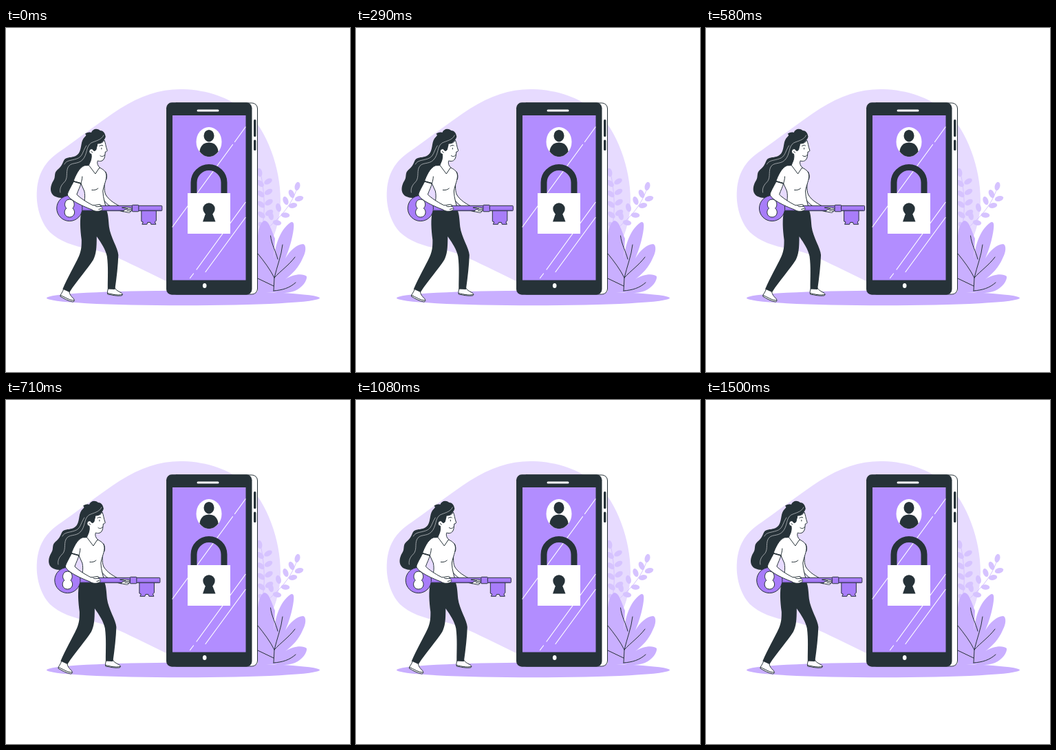
Recreate the animation shown at these times as an HTML page. Size 500 by 500 pixels, loop 1.54 s.

```html
<!DOCTYPE html>
<html lang="en">
<head>
<meta charset="utf-8">
<title>Unlocking a phone</title>
<style>
html, body { margin: 0; width: 100%; height: 100%; overflow: hidden; background: #fff; }
svg { display: block; width: 100vw; height: 100vh; }
.dark { fill: #263238; }
.white { fill: #fff; }
.leaf { fill: #c9afff; }
.line { fill: none; stroke: #263238; stroke-linecap: round; stroke-linejoin: round; }
.skin { fill: #fff; stroke: #263238; stroke-linecap: round; stroke-linejoin: round; }
.key { fill: #a87df9; stroke: #263238; stroke-linejoin: round; }
.glare { fill: none; stroke: #fff; stroke-width: 1.2; stroke-linecap: round; }
</style>
</head>
<body>
<svg viewBox="0 0 500 500">
  <path fill="#e7dbff" d="M45 235C47 212 56 195 76 181C101 164 134 138 166 117C196 98 226 88 258 89C292 90 325 101 350 122C379 148 399 203 399 250C399 296 377 338 345 361C312 384 268 385 235 369L190 347C167 336 145 325 121 321C98 317 78 310 64 297C50 282 43 258 45 235Z"/>
  <ellipse class="leaf" cx="257.5" cy="392.5" rx="198.5" ry="10.8"/>

  <g id="sprigs" fill="#d6c3ff" stroke="#d6c3ff"></g>
  <g class="leaf">
    <path d="M366 300C374 308 385 322 389 335C392 313 399 293 413 283C418 280 419 285 418 292C416 308 411 323 406 335C412 324 423 314 432 314C437 316 436 326 431 335C426 347 416 358 406 365C417 358 431 356 437 361C438 367 431 377 420 382C409 386 397 386 389 384L366 384Z"/>
    <path d="M366 302C367 290 371 281 376 280C383 282 387 297 391 306L389 340L366 316Z"/>
  </g>
  <g class="line" stroke-width="1">
    <path d="M384.500 302C386 315 392 324 395 336M402 315C400 332 394 346 390 363M366 328C375 339 384 351 390 363M420 333C411 345 399 353 390 363L389 382M366 364L389 375M421 370C412 378 402 381 389 382"/>
  </g>

  <rect class="skin" x="240" y="109" width="125.500" height="278" rx="8"/>
  <rect class="dark" x="233" y="108.300" width="124.500" height="279.400" rx="8"/>
  <rect x="242" y="127" width="106.500" height="239.500" fill="#b28dff"/>
  <path class="glare" stroke-width="3" style="stroke-width:3" d="M279 120H308"/>
  <ellipse class="white" cx="288.700" cy="374.500" rx="2.800" ry="3.500"/>
  <rect class="dark" x="360" y="133" width="3.400" height="25" rx="1.500"/>
  <rect class="dark" x="360" y="162.500" width="3.400" height="15.500" rx="1.500"/>
  <path class="glare" d="M348 144L332.500 165.500M329.500 169.500L242 289M348 253.500L277 351M272.500 357L267.500 363.500M348 275.500L290 354.500"/>

  <ellipse class="white" cx="295" cy="165.500" rx="18.500" ry="21.500"/>
  <ellipse class="dark" cx="295" cy="156.700" rx="7.500" ry="8.700"/>
  <path class="dark" d="M281.500 179.500C282 171 288 166.500 295 166.500S308 171 308.500 179.500C305 184.500 300 187 295 187S285 184.500 281.500 179.500Z"/>
  <path class="line" stroke-width="9" style="stroke-linecap:butt" d="M273 241V224.500A22 22 0 0 1 317 224.500V241"/>
  <rect class="white" x="264" y="240" width="62" height="59"/>
  <circle class="dark" cx="295" cy="263" r="8.700"/>
  <path class="dark" d="M291 267L286 281.500H304.500L299 267Z"/>

  <g id="woman">
    <g class="skin" stroke-width="1">
      <path d="M149 378C148 381 147 384 148 387C154 388 162 390 168 389C171 388 169 385 166 384C162 382 159 380 158 377Z"/>
      <path d="M84 379C83 384 79 387 79 390C84 393 91 397 97 398C100 398 100 395 98 393C95 390 92 387 92 382Z"/>
      <path fill="none" d="M148 385.500C155 387 162 389 169 387.500M79.500 388.500C86 391 92 396 99 396"/>
    </g>
    <path class="dark" d="M110 264C107 279 108 292 110 308C110 316 110 323 106 332C99 347 90 362 82.500 379.500L92.500 384C104 366 119 350 127 337C131 329 132 321 132 303C139 313 145 322 147 332C149 347 148 363 148 379.500L158.500 380C161 362 163 345 163.500 330C163 320 152 304 150 289C149 279 149 271 146 264Z"/>

    <path class="dark" d="M145 158C144 152 141 149 137 149C132 145 126 147 124 152C121 151 117 152 115 154C117 155 117 156 115 158C108 164 111 174 106 182C99 191 88 185 84 193C82 198 80 202 75 206C69 211 73 216 69 222C64 230 63 241 72 245C80 249 91 247 95 239C97 234 96 229 101 222C106 213 111 205 118 201C126 196 125 183 132 171C137 168 143 165 145 158Z"/>
    <path class="skin" stroke-width="1" d="M122 196C124 192 125 187 124 183C120 183 120 177 124 175C127 175 129 179 131 177C132 174 132 171 133 168C137 168 141 167 143 163C145 167 145 172 147 177C148 179 146 180 144.500 180C144 184 144 189 142 191C140 194 136 194 133.500 193C132 197 134 201 137 203L130 213L120 202Z"/>
    <path class="dark" d="M123 177C123 169 127 167 132 167L133 171C131 174 132 178 129 179C126 179 126 174 123 177Z"/>
    <path class="line" stroke-width="1" d="M137 185.500C139 187.500 142 187 143.500 184.500M139 174.500V176M136 171.500C138 170 140 170 141 171M124 179.500L126 181"/>
    <path class="line" style="stroke:#cfd2d4" stroke-width=".7" d="M142 156C139 163 130 164 124 167C116 172 119 184 111 192C104 199 94 194 90 203C87 210 91 219 84 225C80 229 78 234 79 239M117 171C111 180 112 187 103 190C94 193 88 192 85 198"/>

    <g class="skin" stroke-width="1">
      <path d="M143 215C144 226 142 235 145 242C150 251 160 256 169 261L174 262L171 267C161 265 149 259 143 251C138 244 138 235 138 229Z"/>
      <path d="M121 200L130 212L136 203C141 205 145 208 146 213C147 220 142 229 141 237C141 247 145 257 146.500 265.500H110C114 256 116 246 114 237L109 226L98 223C101 215 106 203 114 200Z"/>
      <path fill="none" d="M145 209C147 213 147 217 146 220M125 235.500C129 236 132 235 134 233M109 226C110 223 111 219 111 216"/>
    </g>

    <g class="key" stroke-width="1">
      <path d="M197 264V281L199.500 282L198 285.300H205L206 282.500H210L211 285.300H218L216.500 282L218.500 280V264Z"/>
      <rect x="108" y="258.300" width="119" height="7.400" rx="1"/>
      <rect x="183.500" y="257.300" width="9.500" height="9.500" rx="1"/>
      <circle cx="92.500" cy="262" r="18.600"/>
      <path class="white" d="M88 262C84 259 85 249 92.500 249S101 259 97 262C102 266 100 275 92.500 275S83 266 88 262Z"/>
    </g>
    <path d="M111 264.300H183M193 264.300H226" stroke="#7f5cc4" stroke-width="1"/>

    <g class="skin" stroke-width="1">
      <path d="M98.500 223C95 230 90 238 89.500 242C91 249 109 258 125 264C129 267 135 267 139 265C142 263 140 260 137 259C139 258 138 256 135 256.500C132 257 129 258 126 257.500C117 253 108 247 103 242C105 236 108 231 109 226Z"/>
      <path fill="none" d="M98.500 223L109 226" stroke-width="1.400"/>
      <path fill="none" d="M137 259C134 260 131 260 130 259M139 262.500L135 263.500"/>
      <path d="M169 261C173 260 178 261 182 261.500C184 262 183 263.500 181 263.500C184 264 183 266 181 266C182 268 179 269 177 268L170 266.500L173 264C175 264 177 263 177 263Z"/>
      <path fill="none" d="M181 263.500L177 263.500M181 266L176 265.500"/>
    </g>
  </g>
</svg>
<script>
const NS = "http://www.w3.org/2000/svg";
const sprigs = document.getElementById("sprigs");
const woman = document.getElementById("woman");

function add(tag, attrs) {
  const el = document.createElementNS(NS, tag);
  for (const k in attrs) el.setAttribute(k, attrs[k]);
  sprigs.appendChild(el);
}

function leaf(x, y, angle) {
  add("ellipse", { rx: 6.3, ry: 3.8, stroke: "none", transform: `translate(${x} ${y}) rotate(${angle})` });
}

function stem(d) {
  add("path", { d, fill: "none", "stroke-width": 1 });
}

stem("M367 308C376 285 379 250 369 206");
stem("M366 306C384 284 412 270 424 230");
leaf(368.5, 210, -100);
for (let i = 0; i < 5; i++) {
  leaf(369.5 + i * 0.6, 226 + i * 15.2, -140);
  if (i < 4) leaf(381 + i * 0.5, 223 + i * 15.2, -30);
}
leaf(423.5, 230, -75);
[[415, 241, -115], [406.500, 251, -110], [396, 261, -105], [385, 273, -105],
 [426, 248, -15], [417, 258, -10], [406, 272, 5], [394, 283, 10], [379, 287, -110]]
  .forEach(p => leaf(...p));

// Shake offsets at every tenth of the cycle
const shake = [0, -1, 2, -4, 4, -4, 4, -4, 2, -1, 0];
const LOOP = 1540, CYCLE = 1500, STEP = 1000 / 24, LEAD = 25;

function offset(ms) {
  const p = (ms % CYCLE) / CYCLE * 10;
  const i = Math.floor(p);
  return shake[i] + (shake[i + 1] - shake[i]) * (p - i);
}

function draw(now) {
  const t = now % LOOP;
  const step = Math.min(36, Math.floor((t + 5) / STEP));
  woman.setAttribute("transform", `translate(${offset(step * STEP + LEAD).toFixed(3)} 0)`);
  requestAnimationFrame(draw);
}
draw(performance.now());
</script>
</body>
</html>
```
